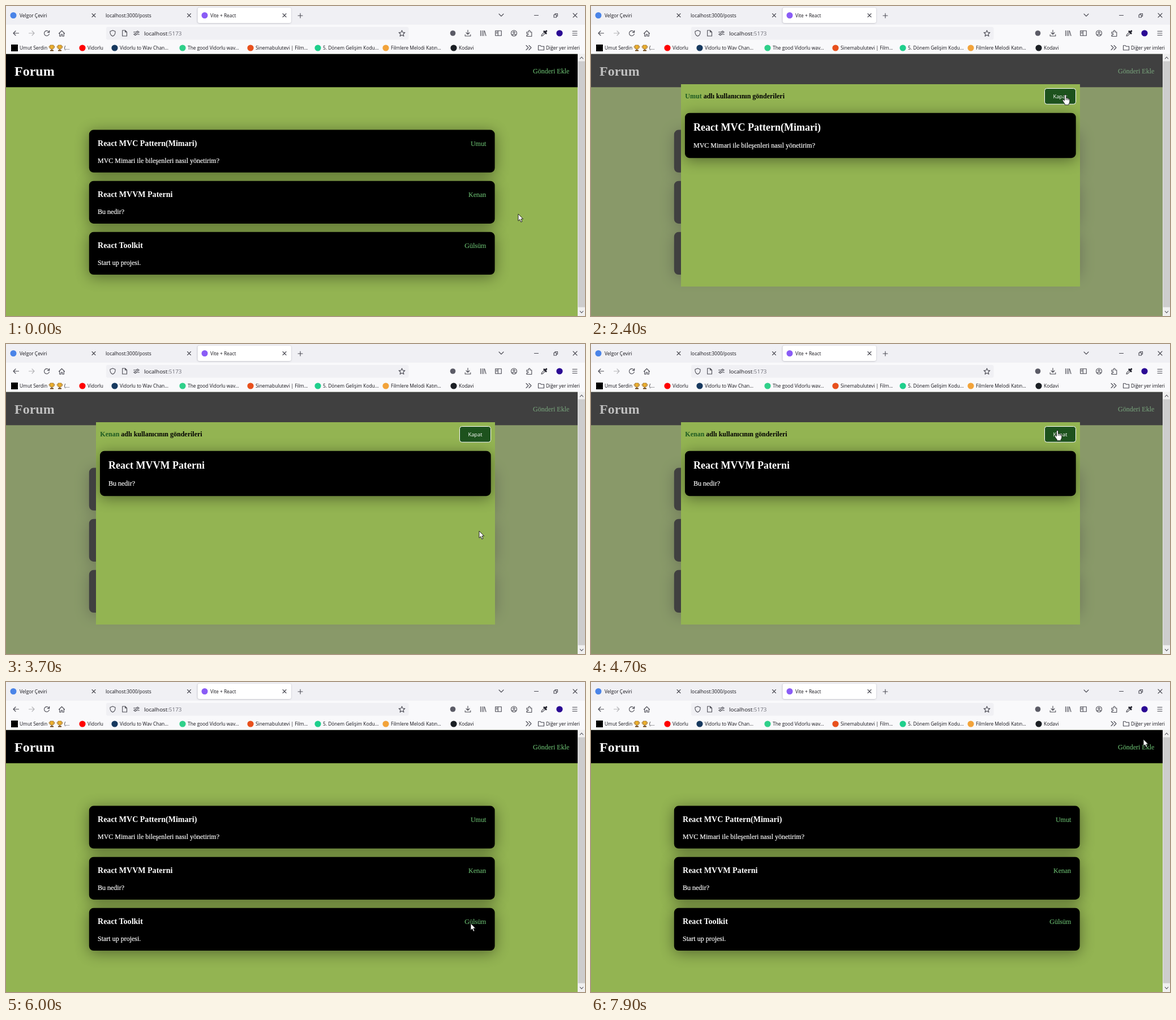
Recreate the animation shown at these times as an HTML page. Size 1023 by 547 pixels, loop 8 s.

```html
<!DOCTYPE html>
<html lang="tr">
<head>
<meta charset="utf-8">
<title>Forum</title>
<style>
html, body { margin: 0; width: 100%; height: 100%; overflow: hidden; background: #f9f9fb; }
svg { display: block; width: 1023px; height: 547px; }
text { white-space: pre; }
.page { font: 12px "Liberation Serif", "Times New Roman", serif; fill: #fff; }
.ui { font: 8.4px "Open Sans", "Noto Sans", sans-serif; fill: #15141a; }
.bold { font-weight: bold; }
.body { stroke: #fff; stroke-width: .2; }
.link { fill: #66b56c; stroke: #66b56c; stroke-width: .15; }
.icon { fill: none; stroke: #4a4a53; stroke-width: 1.1; stroke-linecap: round; stroke-linejoin: round; }
</style>
</head>
<body>
<svg id="stage" viewBox="0 0 1023 547">
  <defs>
    <filter id="soft" x="-20%" y="-80%" width="140%" height="260%"><feGaussianBlur stdDeviation="13"/></filter>
    <filter id="tabShadow" x="-5%" y="-20%" width="110%" height="140%"><feGaussianBlur stdDeviation="1.2"/></filter>
    <clipPath id="modalClip"><rect x="159" y="138" width="705" height="357"/></clipPath>
    <g id="trophy">
      <path d="M-3 -3H-5Q-5 1-2 1M3 -3H5Q5 1 2 1" fill="none" stroke="#b87a12" stroke-width="1"/>
      <path d="M-3-5H3V-1Q3 2 0 2Q-3 2-3-1Z" fill="#eeb12c" stroke="#8a5a10" stroke-width=".6"/>
      <path d="M-.7 2H.7V3.5H3V5.5H-3V3.5H-.7Z" fill="#6b4517"/>
    </g>
  </defs>
  <g id="page" class="page"></g>
  <g id="modal" class="page"></g>
  <g id="chrome" class="ui"></g>
  <path id="arrow" d="M0 0V12.2L2.8 9.6L4.8 14.2L6.9 13.3L4.9 8.8H8.7Z" fill="#fff" stroke="#111" stroke-width=".9"/>
  <g id="hand" fill="#fff" stroke="#111" stroke-width=".8" stroke-linejoin="round">
    <path d="M-1.4 10V1Q-1.4-.6 0-.6Q1.4-.6 1.4 1V5.3Q3.4 4.5 3.9 6Q5.6 5.4 6 6.9Q7.7 6.6 7.8 8.4V12Q7.6 14.4 6.2 15.3V17.4H-.8V15.6Q-3.4 12.8-4.7 9.7Q-4.9 8.3-3.6 8.3Q-2.3 8.6-1.4 10Z"/>
    <path d="M1.4 5.3V9M3.9 6V9.2M6 7V9.4" fill="none"/>
  </g>
</svg>
<script>
const LOOP = 8000, STEP = 100;
const $ = id => document.getElementById(id);

const rect = (x, y, w, h, fill, r = 0, extra = "") =>
  `<rect x="${x}" y="${y}" width="${w}" height="${h}" rx="${r}" fill="${fill}" ${extra}/>`;
const dot = (x, y, r, fill) => `<circle cx="${x}" cy="${y}" r="${r}" fill="${fill}"/>`;
const text = (x, y, s, cls = "", extra = "") =>
  `<text x="${x}" y="${y}" class="${cls}" ${extra}>${s}</text>`;
const icon = (x, y, d, extra = "") =>
  `<path class="icon" transform="translate(${x} ${y})" d="${d}" ${extra}/>`;
const card = (x, y, w, h) =>
  rect(x, y + 4, w, h, "#000", 8, 'opacity=".42" filter="url(#soft)"') + rect(x, y, w, h, "#000", 8);

const posts = [
  { title: "React MVC Pattern(Mimari)", body: "MVC Mimari ile bileşenleri nasıl yönetirim?", user: "Umut", open: 1300, close: 2500 },
  { title: "React MVVM Paterni", body: "Bu nedir?", user: "Kenan", open: 3600, close: 4800 },
  { title: "React Toolkit", body: "Start up projesi.", user: "Gülsüm", open: 6200, close: 7200 }
];
const cardTop = i => 218.6 + 90.1 * i;

function drawPage() {
  const right = 'text-anchor="end"';
  $("page").innerHTML =
    rect(0, 84.5, 1010, 462.5, "#93b452") +
    posts.map((p, i) => card(146.8, cardTop(i), 716.8, 75.2)).join("") +
    posts.map((p, i) => {
      const y = cardTop(i);
      return text(162, y + 28.6, p.title, "bold", 'font-size="14.04"') +
        text(162, y + 57.9, p.body, "body") +
        text(848.3, y + 27.9, p.user, "link", right);
    }).join("") +
    rect(0, 84.5, 1010, 58.8, "#000") +
    text(15, 122.5, "Forum", "bold", 'font-size="24"') +
    text(995.3, 119, "Gönderi Ekle", "link", right);
}

function drawModal() {
  $("modal").innerHTML =
    rect(0, 84.5, 1010, 462.5, "#808080", 0, 'opacity=".5"') +
    rect(159, 138, 705, 357, "#93b452") +
    `<g clip-path="url(#modalClip)">${card(166, 188.7, 690.7, 79.5)}</g>` +
    `<text x="166.3" y="163.3" class="bold" fill="#000"><tspan id="owner" fill="#1d5a22"></tspan> adlı kullanıcının gönderileri</text>` +
    text(181, 220, "", "bold", 'id="postTitle" font-size="18"') +
    text(181, 250.3, "", "body", 'id="postBody"') +
    rect(801.5, 145.5, 55, 27.7, "#1d521d", 4, 'stroke="#fff"') +
    text(829, 163, "Kapat", "", `text-anchor="middle" style="font:9.3px 'Open Sans',sans-serif"`);
}

function drawChrome() {
  const cross = "M-3-3L3 3M3-3L-3 3";
  const bookmarks = [
    [24, "Umut Serdin", "#000", true], [144, "Vidorlu", "#f00"],
    [201, "Vidorlu to Wav Chan...", "#17395f"], [321, "The good Vidorlu wav...", "#2fd08a"],
    [441, "Sinemabulutevi | Film...", "#e8501c"], [560, "5. Dönem Gelişim Kodu...", "#1fcf8c"],
    [680, "Filmlere Melodi Katın...", "#f2a33a"], [800, "Kodavi", "#1b1f24"]
  ];
  $("chrome").innerHTML =
    rect(0, 0, 1023, 33.5, "#f0f0f4") + rect(0, 33, 1023, 51.5, "#f9f9fb") +
    rect(338, 3, 166, 27.5, "#8d8d99", 4, 'opacity=".6" filter="url(#tabShadow)"') +
    rect(338.5, 2.7, 165.5, 27.3, "#fff", 3.5) +
    dot(13, 16.5, 5.5, "#4a84e8") + dot(351, 16.5, 5.5, "#8a5cf6") +
    text(24, 20, "Velgor Çeviri") + text(176, 20, "localhost:3000/posts") + text(361, 20, "Vite + React") +
    [155, 323.5, 492].map(x => icon(x, 16.5, cross)).join("") +
    icon(520, 17, "M-4 0H4M0-4V4") + icon(875, 16, "M-4-2L0 2L4-2") +
    icon(937, 16.5, "M-3.5 0H3.5") + icon(971, 16.5, "M-3-1H1.5V3.5H-3ZM-1-1V-3H3.5V1.5H1.5") +
    icon(1005.5, 16.5, "M-3.5-3.5L3.5 3.5M3.5-3.5L-3.5 3.5") +
    rect(177, 37, 534.5, 22.5, "#f0f0f4", 3) +
    `<text x="244" y="52" font-size="9.85">localhost<tspan fill="#6d6d77">:5173</tspan></text>` +
    icon(18, 48, "M4.5 0H-4.5M-1-4L-5 0L-1 4") +
    icon(45, 48, "M-4.5 0H4.5M1-4L5 0L1 4", 'opacity=".4"') +
    icon(72, 48, "M4.2-1.5A4.5 4.5 0 1 0 4.4 1.2M4.7-4.8V-1.4H1.3") +
    icon(98.5, 48.5, "M-5 0L0-5L5 0M-3.8-1V4.8H-1.2V1.5H1.2V4.8H3.8V-1") +
    icon(188.5, 48, "M0-5L4.5-3.3V-1Q4.3 3.5 0 5.3Q-4.3 3.5-4.5-1V-3.3Z") +
    icon(209.5, 48, "M-3.8-5H1L4-2V5H-3.8ZM1-5V-2H4") +
    icon(230.5, 48, "M-5-2H0M4-2H5M-5 2H-4M0 2H5M.4-2A1.6 1.6 0 1 0 3.6-2A1.6 1.6 0 1 0 .4-2M-3.6 2A1.6 1.6 0 1 0-.4 2A1.6 1.6 0 1 0-3.6 2") +
    icon(699.5, 48.5, "M0-5.5L1.6-1.9L5.4-1.6L2.5 1L3.4 4.8L0 2.8L-3.4 4.8L-2.5 1L-5.4-1.6L-1.6-1.9Z") +
    dot(789.5, 48, 4.8, "#5b5b66") +
    icon(816, 48, "M0-5.5V2M-3-1L0 2L3-1M-4.8 2.5V5H4.8V2.5") +
    icon(843, 48, "M-4.5-4.5V4.5M-1.7-4.5V4.5M1-4.5V4.5M2.5-4L5 4.5") +
    icon(870, 48, "M-5.3-4.2H5.3V4.2H-5.3ZM-.7-4.2V4.2M-3.8-2H-2M-3.8 0H-2") +
    icon(897.5, 48, "M-5 0A5 5 0 1 0 5 0A5 5 0 1 0-5 0M-1.6-1.3A1.6 1.6 0 1 0 1.6-1.3A1.6 1.6 0 1 0-1.6-1.3M-3 3.4V2.2H3V3.4") +
    icon(924.5, 48.5, "M-4.5-2.5H-1.2V-4Q-1.2-5.5 .2-5.5Q1.6-5.5 1.6-4V-2.5H4.3V5H-4.5V2.6H-3Q-1.7 2.4-1.7 1.2Q-1.7 0-3 0H-4.5Z") +
    icon(951, 48, "M-5 5L-4.4 2.6L.6-2.4L2.4-.6L-2.6 4.4Z") +
    icon(953, 46, "M-2.2-1.2L1.2 2.2M0 0L1.8-1.8", 'style="stroke:#252530;stroke-width:3"') +
    dot(978, 48, 5.6, "#2b0a94") +
    icon(1005, 48, "M-4-3.5H4M-4 0H4M-4 3.5H4") +
    bookmarks.map(([x, label, color, square]) =>
      (square ? rect(x - 15, 68, 12, 12, color) : dot(x - 9, 74, 5.6, color)) + text(x, 77, label)).join("") +
    `<use href="#trophy" x="81" y="74"/><use href="#trophy" x="95" y="74"/>` + text(103, 77, "(...") +
    icon(923.5, 73.5, "M-4.5-4L-.5 0L-4.5 4M.5-4L4.5 0L.5 4") +
    icon(945.5, 73.5, "M-5-3.8H-1.5L0-2.3H5V4.2H-5Z") + text(954, 77, "Diğer yer imleri") +
    rect(1010, 84.5, 13, 462.5, "#f0f0f0") + rect(1010.7, 97.5, 12.3, 434, "#cdcdcd") +
    icon(1017, 91.5, "M-2.7 1.5L0-1.5L2.7 1.5") + icon(1017, 540, "M-2.7-1.5L0 1.5L2.7-1.5");
}

// Pointer stops: time, x, y
const stops = [
  [0, 905, 367], [400, 905, 367], [1100, 836, 241], [1400, 836, 241],
  [2200, 838, 157], [2600, 838, 157], [3300, 836, 330], [3700, 836, 330],
  [4500, 824, 153], [5000, 824, 153], [6000, 821, 426], [6300, 823, 425],
  [6900, 822, 157], [7200, 822, 157], [7700, 966, 103], [7900, 976, 101]
];

function pointerAt(t) {
  const next = stops.findIndex(s => s[0] > t);
  if (next < 0) return stops.at(-1).slice(1);
  const [t0, x0, y0] = stops[next - 1], [t1, x1, y1] = stops[next];
  const u = (t - t0) / (t1 - t0), k = u * u * (3 - 2 * u);
  return [x0 + (x1 - x0) * k, y0 + (y1 - y0) * k];
}

const inside = ([x, y], l, t, r, b) => x >= l && x <= r && y >= t && y <= b;

function isClickable(p, modalOpen) {
  if (modalOpen) return inside(p, 801, 145, 857, 174);
  return inside(p, 931, 108, 996, 123) ||
    posts.some((_, i) => inside(p, i === 2 ? 807 : 818, cardTop(i) + 16, 849, cardTop(i) + 31));
}

function render(t) {
  const post = posts.find(p => t >= p.open && t < p.close);
  $("modal").style.display = post ? "" : "none";
  if (post) {
    $("owner").textContent = post.user;
    $("postTitle").textContent = post.title;
    $("postBody").textContent = post.body;
  }
  // The pointer shape reacts slightly after the movement.
  const hover = isClickable(pointerAt(Math.max(0, t - 150)), post);
  const place = `translate(${pointerAt(t).map(v => v.toFixed(1)).join(" ")})`;
  for (const [id, shown] of [["arrow", !hover], ["hand", hover]]) {
    $(id).setAttribute("transform", place);
    $(id).style.display = shown ? "" : "none";
  }
}

drawPage();
drawModal();
drawChrome();
const start = performance.now();
function tick() {
  const t = (performance.now() - start) % LOOP;
  render(Math.floor(t / STEP) * STEP);
  requestAnimationFrame(tick);
}
tick();
</script>
</body>
</html>
```
